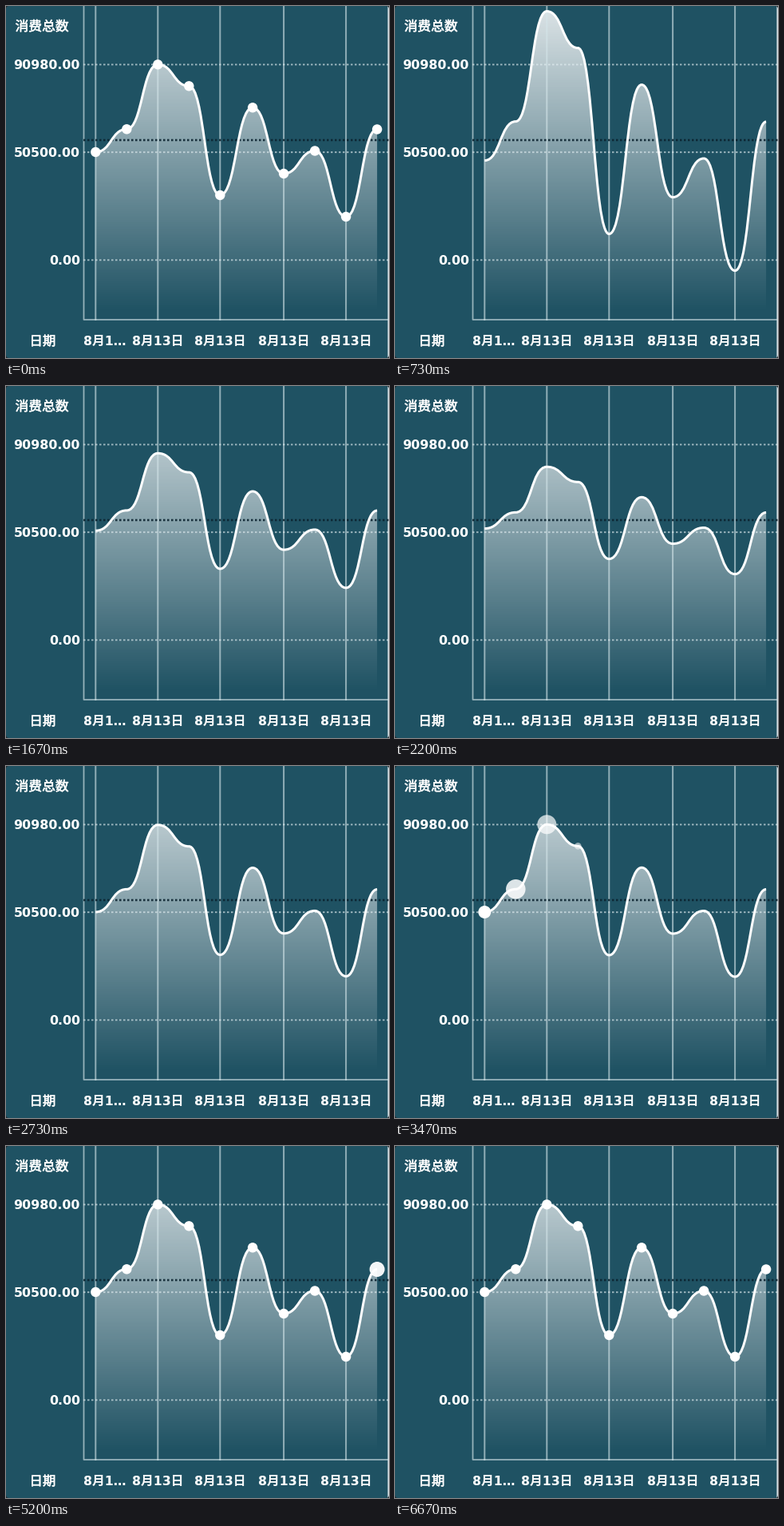
A matplotlib script for the animation above (6.74 s loop, 480 by 441 pixels).

```python
import numpy as np
import matplotlib.pyplot as plt
from matplotlib.animation import FuncAnimation
from matplotlib.patches import Circle, FancyBboxPatch, PathPatch
from matplotlib.path import Path
from matplotlib.patheffects import withStroke

W, H, DPI = 480, 441, 100
FRAMES, LOOP_MS, FPS = 102, 6740, 15
BG, GRID = "#1f5263", "#d5e6ea"
PX = 72 / DPI  # points per pixel

plt.rcParams["font.family"] = ["DejaVu Sans", "Noto Sans CJK JP"]
plt.rcParams["toolbar"] = "None"

# Ten days; the right half sits two pixels further out
day = np.arange(10)
xs = 112.3 + 39 * day + 1.8 * (day > 4)
ys = np.array([183, 154.3, 73.3, 100.3, 237, 127.3, 210, 181.5, 264, 154.5])
MEAN_Y, FLOOR_Y = 168, 393
DOT_R, DOT_PEAK = 6.2, 13

# Vertical swing around the mean: (seconds, scale)
SWING = [(0.07, 0), (0.88, 1.85), (1.99, 0.65), (2.80, 1)]
DOT_START, DOT_GAP = 2.80, 0.20

fig = plt.figure(figsize=(W / DPI, H / DPI), dpi=DPI, facecolor="#24282b")
ax = fig.add_axes([0, 0, 1, 1])


def ease(p):
    return 0.5 - 0.5 * np.cos(np.pi * np.clip(p, 0, 1))


def line(x, y, color, width, **kw):
    return ax.plot(x, y, color=color, lw=width * PX, snap=False, **kw)[0]


def dotted(y, color, width, dash, alpha):
    line([97, W], [y, y], color, width, alpha=alpha, zorder=3,
         linestyle=(0, (dash / width, dash / width)), dash_capstyle="butt")


def label(x, y, text, size, ha="left", weight="bold"):
    return ax.text(x, y, text, color="white", fontsize=size * PX, ha=ha,
                   va="baseline", weight=weight, zorder=6)


def title(x, y, text, size):
    """Regular text thickened to a medium weight."""
    label(x, y, text, size, weight="normal").set_path_effects(
        [withStroke(linewidth=0.5 * PX, foreground="white")])


def swing(t):
    for (t0, a), (t1, b) in zip(SWING, SWING[1:]):
        if t < t1:
            return a + (b - a) * ease((t - t0) / (t1 - t0))
    return 1


def dot_state(age):
    """Radius and opacity of a dot, given seconds since it appeared."""
    if age <= 0:
        return 0, 0
    alpha = min(1, 0.5 + 0.75 * age)
    if age < 0.37:
        return DOT_PEAK * (1 - (1 - age / 0.37) ** 2), alpha
    return DOT_PEAK + (DOT_R - DOT_PEAK) * ease((age - 0.37) / 0.45), alpha


def curve(y):
    """Bezier path through the points, level at each one."""
    verts, codes = [(xs[0], y[0])], [Path.MOVETO]
    for i in range(len(xs) - 1):
        mid = (xs[i] + xs[i + 1]) / 2
        verts += [(mid, y[i]), (mid, y[i + 1]), (xs[i + 1], y[i + 1])]
        codes += [Path.CURVE4] * 3
    return verts, codes


# Rounded panel with a light right edge
panel = ax.add_patch(FancyBboxPatch(
    (0, 0), W, H, boxstyle="round,pad=0,rounding_size=4",
    fc=BG, lw=0, zorder=0))
line([479.2, 479.2], [0, H], "#e3eaec", 1.5, zorder=2).set_clip_path(panel)

# Gradient under the curve
rgba = np.ones((H, 1, 4))
rgba[:, 0, 3] = np.clip(0.85 * (1 - np.arange(H) / 382), 0, 1)
fill = ax.imshow(rgba, extent=(0, W, H, 0), aspect="auto",
                 interpolation="nearest", zorder=1)

# Grid, axes and mean
for x in xs[::2]:
    line([x, x], [0, FLOOR_Y], GRID, 2, alpha=0.62, zorder=2)
line([97.5, 97.5, W], [0, FLOOR_Y, FLOOR_Y], GRID, 1.8, alpha=0.65, zorder=2)
for y in (73.4, 183.2, 318.3):
    dotted(y, "#e4eff2", 1.9, 2.5, 0.65)
dotted(MEAN_Y, "#0c2430", 2.6, 2.5, 0.9)

# Labels
title(11.5, 31, "消费总数", 16.8)
title(29.5, 425.2, "日期", 16.4)
for y, text in ((73, "90980.00"), (183, "50500.00"), (318, "0.00")):
    label(93, y + 5.8, text, 15.9, ha="right")
label(97.5, 425.2, "8月1…", 15.7)
for x in xs[2::2]:
    label(x, 425.2, "8月13日", 15.7, ha="center")

stroke = ax.add_patch(PathPatch(Path(*curve(ys)), fill=False, ec="white",
                                lw=3 * PX, capstyle="butt", zorder=4))
dots = [ax.add_patch(Circle((x, y), DOT_R, fc="white", lw=0, zorder=5))
        for x, y in zip(xs, ys)]

ax.set_xlim(0, W)
ax.set_ylim(H, 0)
ax.axis("off")


def update(k):
    t = k / FPS if k else LOOP_MS / 1000  # opens on the settled chart
    verts, codes = curve(MEAN_Y + (ys - MEAN_Y) * swing(t))
    stroke.set_path(Path(verts, codes))
    area = Path(verts + [(xs[-1], FLOOR_Y), (xs[0], FLOOR_Y), verts[0]],
                codes + [Path.LINETO, Path.LINETO, Path.CLOSEPOLY])
    fill.set_clip_path(area, ax.transData)
    for i, dot in enumerate(dots):
        radius, alpha = dot_state(t - DOT_START - i * DOT_GAP)
        dot.set_radius(radius)
        dot.set_alpha(alpha)
    return [fill, stroke, *dots]


anim = FuncAnimation(fig, update, frames=FRAMES, interval=LOOP_MS / FRAMES,
                     repeat=True, repeat_delay=0, blit=False)
plt.show()
```
